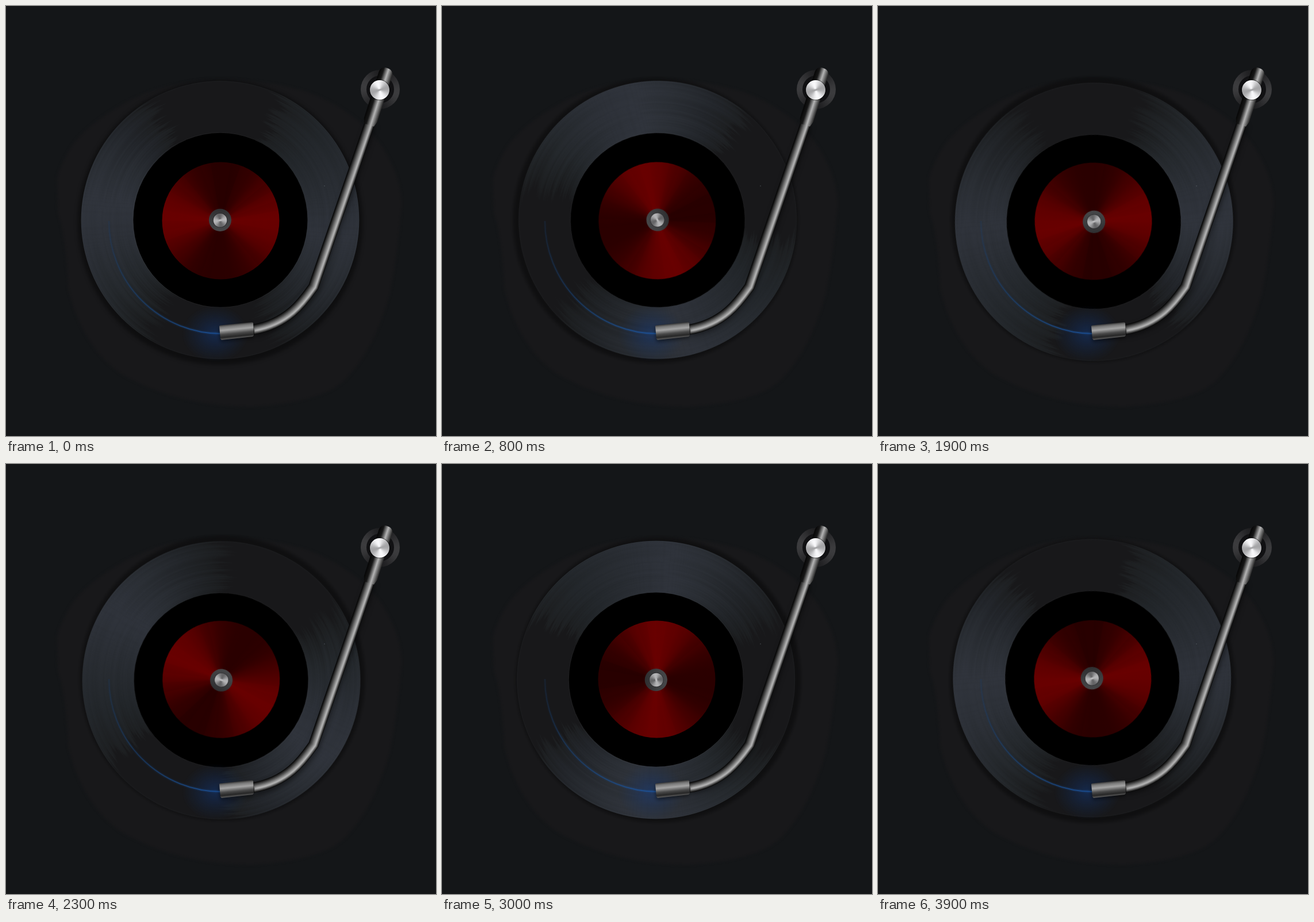
Write an HTML page with a canvas that moves like this. It is 748x748 px and loops after 4 s.

```html
<!DOCTYPE html>
<html lang="en">
<head>
<meta charset="utf-8">
<title>Turntable</title>
<style>
  html, body { margin: 0; width: 100%; height: 100%; overflow: hidden; background: #141618; }
  canvas { position: absolute; left: 0; top: 0; }
  #disc { left: 110px; top: 110px; animation: spin 4s steps(40) infinite; }
  @keyframes spin { to { transform: rotate(360deg); } }
</style>
</head>
<body>
<canvas id="base" width="748" height="748"></canvas>
<canvas id="disc" width="528" height="528"></canvas>
<canvas id="arm" width="748" height="748"></canvas>
<script>
const TAU = Math.PI * 2, rad = d => d * Math.PI / 180;
const layer = id => document.getElementById(id).getContext('2d');

let seed = 7;
const rnd = () => (seed = seed * 16807 % 2147483647) / 2147483647;

function circle(g, x, y, r, fill) {
  g.beginPath();
  g.arc(x, y, r, 0, TAU);
  g.fillStyle = fill;
  g.fill();
}

function ring(g, x, y, r, width, color) {
  g.beginPath();
  g.arc(x, y, r, 0, TAU);
  g.lineWidth = width;
  g.strokeStyle = color;
  g.stroke();
}

function stops(grad, list) {
  for (const [at, color] of list) grad.addColorStop(at, color);
  return grad;
}

// Brushed metal: two light rays along the given axis
function brushed(g, x, y, axis, lo, hi) {
  const grad = g.createConicGradient(rad(axis), x, y);
  for (let i = 0; i <= 48; i++) {
    const v = Math.round(lo + (hi - lo) * (0.5 + 0.5 * Math.cos(i / 24 * TAU)));
    grad.addColorStop(i / 48, `rgb(${v},${v},${v + 2})`);
  }
  return grad;
}

function drawBase(g) {
  g.filter = 'blur(2px)';
  g.fillStyle = '#18181a';
  g.fill(new Path2D(`M88 300 Q105 245 140 215 Q240 128 374 128 Q450 128 520 148
    Q610 180 655 245 Q690 300 688 350 Q682 430 668 500 Q640 600 590 650 Q550 690 430 697
    Q300 698 200 640 Q130 590 108 490 Q104 400 90 360 Z`));
}

function drawDisc(g) {
  const x = 372.5, y = 372.3;
  g.translate(-110, -110);
  g.filter = 'blur(3px)';
  circle(g, x, y + 4, 248, 'rgba(0,0,0,.4)');
  g.filter = 'none';
  circle(g, x, y, 242, '#18181a');

  // Each groove catches the light at a slightly different angle
  const sheen = [[0, '#18181a'], [56, '#18181a'], [59, '#1d1f21'], [78, '#22262a'],
    [104, '#292d33'], [126, '#2f333b'], [144, '#2a2e34'], [166, '#212428'],
    [180, '#1c1e20'], [186, '#18181a'], [240, '#18181a'], [246, '#1c1e20'],
    [264, '#24282c'], [288, '#2c3037'], [308, '#30343c'], [326, '#2a2e34'],
    [344, '#22252a'], [357, '#1d1f21'], [360, '#18181a']].map(([a, c]) => [a / 360, c]);
  let drift = 0;
  for (let r = 152; r <= 241; r++) {
    drift = drift * 0.6 + (rnd() - 0.5) * 9;
    ring(g, x, y, r, 1.6, stops(g.createConicGradient(rad(-120 + drift), x, y), sheen));
  }
  ring(g, x, y, 241.3, 1, 'rgba(130,140,150,.04)');
  circle(g, x + 0.6, y, 151.5, '#000');
  ring(g, x, y, 152, 1, 'rgba(110,115,120,.08)');

  const label = g.createConicGradient(0, 373.5, 373.5);
  const red = a => 40 + 63 * Math.abs(Math.cos(rad(a - 3))) ** 2.5;
  for (let i = 0; i < 36; i++) {
    const shift = rnd() * 4 - 2;
    for (const a of [i * 10, i * 10 + 10])
      label.addColorStop(a / 360, `rgb(${Math.round(red(a) + shift)},0,0)`);
  }
  circle(g, 373.5, 373.5, 102, label);

  circle(g, x, y, 19.6, stops(g.createLinearGradient(0, y - 20, 0, y + 20),
    [[0, '#2e2e30'], [0.5, '#3c3d3f'], [1, '#464749']]));
  circle(g, x, y + 0.5, 12.8, '#2b2b2d');
  circle(g, x, y + 0.5, 11.8, brushed(g, x, y + 0.5, -10, 100, 180));
  circle(g, x, y + 0.5, 2, 'rgba(225,225,228,.55)');
}

function drawGlow(g) {
  g.save();
  g.translate(364, 570);
  g.scale(1, 0.85);
  g.fillStyle = stops(g.createRadialGradient(0, 0, 0, 0, 0, 58),
    [[0, 'rgba(18,60,130,.48)'], [0.4, 'rgba(18,54,118,.3)'], [1, 'rgba(18,50,100,0)']]);
  g.fillRect(-60, -60, 120, 120);
  g.restore();

  const fade = stops(g.createLinearGradient(179, 372, 372, 570),
    [[0, 'rgba(24,62,110,.25)'], [0.45, 'rgba(24,70,128,.55)'], [1, 'rgba(28,88,165,.85)']]);
  g.strokeStyle = fade;
  for (const [w, alpha] of [[6, 0.15], [2.2, 0.85]]) {
    g.globalAlpha = alpha;
    g.lineWidth = w;
    g.beginPath();
    g.arc(375, 374, 196, Math.PI / 2, Math.PI);
    g.stroke();
  }
  g.globalAlpha = 1;
}

// Round tube: nested strokes from the dark edge to the lit core on its right
function tube(g, path, width) {
  const n = 14;
  g.lineJoin = 'round';
  for (let i = 0; i <= n; i++) {
    const t = i / n, v = Math.round(6 + 170 * t);
    g.save();
    g.translate(2.9 * t, 1.6 * t);
    g.lineWidth = width * (1 - t) + 1.5;
    g.strokeStyle = `rgb(${v},${v},${v})`;
    g.stroke(path);
    g.restore();
  }
}

function drawArm(g) {
  circle(g, 651, 145, 34, brushed(g, 651, 145, 10, 28, 60));
  circle(g, 651, 145, 24, '#111113');

  const rod = new Path2D('M633 203 L535 488 C518 512 492 552 430 563');
  g.save();
  g.shadowColor = 'rgba(0,0,0,.45)';
  g.shadowBlur = 8;
  g.shadowOffsetX = 2;
  g.shadowOffsetY = 4;
  g.lineWidth = 16;
  g.strokeStyle = '#060606';
  g.stroke(rod);
  g.restore();
  tube(g, rod, 16.5);

  g.save();
  g.translate(651, 146);
  g.rotate(rad(17.8));
  g.fillStyle = stops(g.createLinearGradient(-12, 0, 12, 0),
    [[0, '#060606'], [0.28, '#161616'], [0.62, '#b4b4b4'], [0.82, '#6a6a6a'], [1, '#262626']]);
  g.fill(new Path2D('M-12 -30 Q-11 -40 0 -40 Q11 -40 12 -30 V55 L9 64 H-9 L-12 55 Z'));
  g.restore();

  circle(g, 650, 146, 18, 'rgba(0,0,0,.5)');
  circle(g, 650, 146, 17, brushed(g, 650, 146, 75, 165, 248));
  circle(g, 650, 146, 2, 'rgba(150,150,152,.6)');

  g.save();
  g.shadowColor = 'rgba(0,0,0,.5)';
  g.shadowBlur = 6;
  g.shadowOffsetY = 3;
  g.fillStyle = stops(g.createLinearGradient(400, 553, 402.5, 578),
    [[0, '#3c3c3c'], [0.12, '#747474'], [0.36, '#a4a4a4'], [0.64, '#484848'], [0.85, '#262626'], [1, '#5a5a5a']]);
  g.fill(new Path2D('M371 557 Q371 555.5 373 555.5 L428 550 L430 551 L431 573 L429 575 L375 581 L373 579 Z'));
  g.restore();
}

drawBase(layer('base'));
drawDisc(layer('disc'));
const front = layer('arm');
circle(front, 554, 313, 0.8, 'rgba(130,138,148,.5)');
drawGlow(front);
drawArm(front);
</script>
</body>
</html>
```
